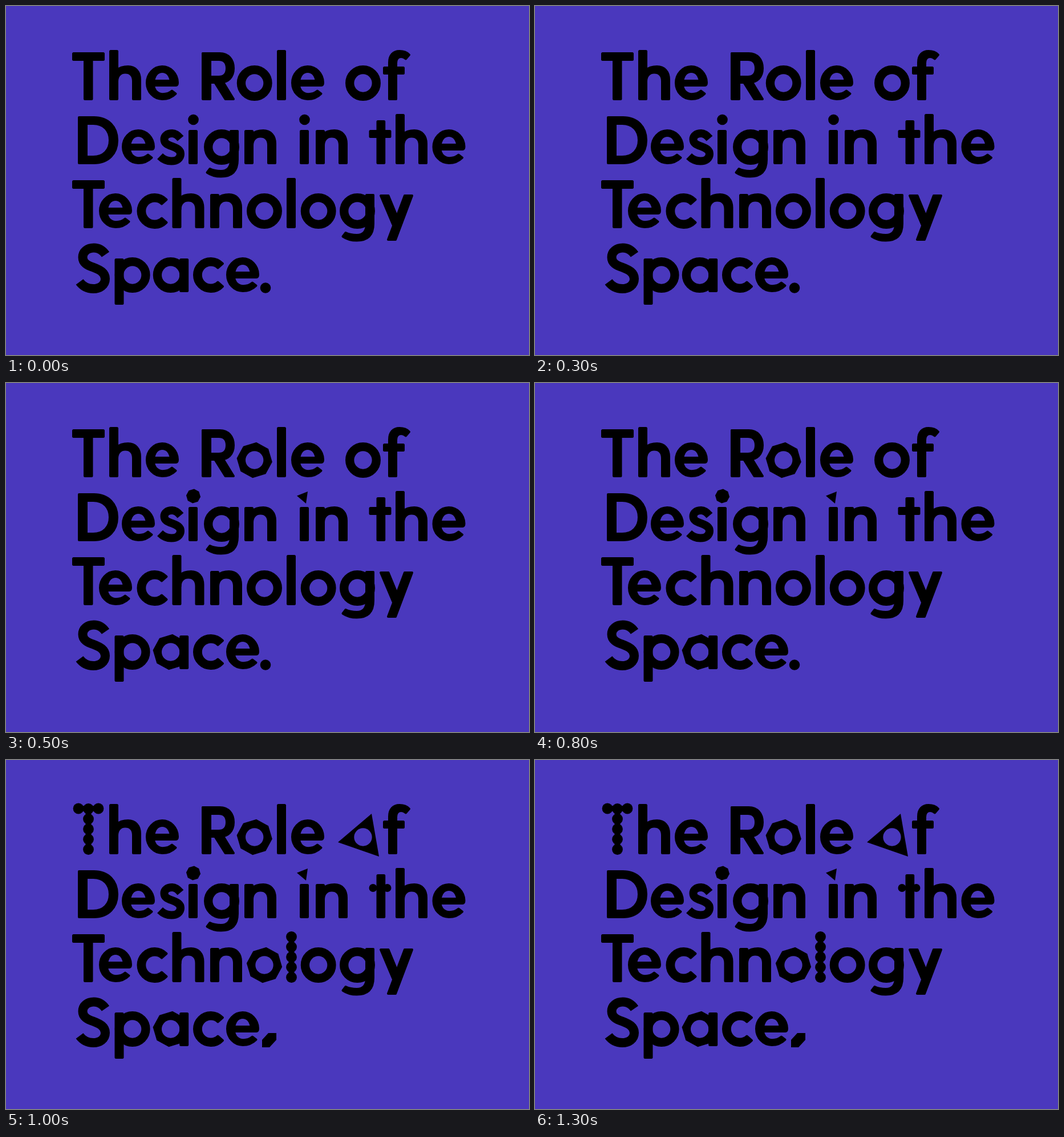
An HTML page with a canvas that plays this animation: 917 px wide and 611 px high, repeating every 1500 ms.

```html
<!DOCTYPE html>
<html lang="en">
<head>
<meta charset="utf-8">
<title>The Role of Design in the Technology Space.</title>
<style>
  html, body { margin: 0; width: 100%; height: 100%; overflow: hidden; background: #4a38bd; }
  canvas { display: block; width: 917px; height: 611px; }
</style>
</head>
<body>
<canvas id="stage" width="917" height="611" role="img"
  aria-label="The Role of Design in the Technology Space."></canvas>
<script>
const ctx = document.getElementById("stage").getContext("2d");
const STEP_MS = 500, STEPS = 3;
const SOFT = 2; // corner rounding

// Outlines are drawn inset by SOFT; the round-joined stroke restores the size.
function soft(d) {
  const path = new Path2D(d);
  ctx.lineWidth = SOFT * 2;
  ctx.fill(path, "evenodd");
  ctx.stroke(path);
}

function bar(x, top, right, bottom) {
  ctx.beginPath();
  ctx.roundRect(x, top, right - x, bottom - top, 2.5);
  ctx.fill();
}

function curve(d, width) {
  ctx.lineWidth = width;
  ctx.stroke(new Path2D(d));
}

function dot(x, y, r) {
  ctx.beginPath();
  ctx.arc(x, y, r, 0, Math.PI * 2);
  ctx.fill();
}

function ring(x) {
  ctx.lineWidth = 15.3;
  ctx.beginPath();
  ctx.arc(x, -30, 23.3, 0, Math.PI * 2);
  ctx.stroke();
}

function polygon(points, hole) {
  const path = new Path2D("M" + points.join("L") + "Z");
  if (hole) {
    path.moveTo(15.7, -30);
    path.arc(0, -30, 15.7, 0, Math.PI * 2);
  }
  ctx.fill(path, "evenodd");
}

function octagon(x, y, r, hole) {
  const points = Array.from({ length: 8 }, (_, i) => {
    const a = (i * 45 + 6) * Math.PI / 180;
    return [x + r * Math.cos(a), y + r * Math.sin(a)];
  });
  polygon(points, hole);
}

function beadColumn(x) {
  for (let i = 0; i < 5; i++) dot(x, -79.5 + i * 17.75, 9.4);
  bar(x - 5, -80, x + 5, -8);
}

const arch = () => soft("M12 -52C18 -57 24 -59 33 -59C46 -59 54 -50 54 -36V-2H42V-33C42 -43 37 -48.5 28 -48.5C20 -48.5 14 -43 14 -33Z");
const iStem = () => bar(0, -60, 16, 0);
const aStem = () => bar(15.5, -59, 31.5, 0);
const tStem = () => bar(0, -77, 15.7, 0);

const glyphs = {
  T() { bar(0, -84, 57, -69); bar(20, -84, 36.5, 0); },
  h() { bar(0, -88, 16, 0); arch(); },
  n() { bar(0, -60, 16, 0); arch(); },
  l() { bar(0, -88, 16, 0); },
  e() {
    soft("M27 -31A27 28.5 0 1 0 0 -2C9 -2 17 -5 23.5 -11.5L17 -16.5C12 -12 7 -10.8 1 -10.8C-8 -10.8 -14 -17 -15 -26H24Q27 -26 27 -31Z" +
      "M-15 -34C-13 -44 -8 -50 0 -50C8 -50 13 -44 15 -34Z");
  },
  R() {
    soft("M2 -82H32C47 -82 56 -71 56 -56C56 -40 46 -31 32 -31H2Z" +
      "M15 -71V-41H30C38 -41 44 -46 44 -56C44 -66 38 -71 30 -71Z");
    bar(0, -84, 17, 0);
    soft("M22 -33L41.5 -2H56L37 -33Z");
  },
  o() { ring(0); },
  f() {
    soft("M2 -2V-66C2 -79 9 -86 20 -86C27 -86 33 -84 37 -79.5L31 -72.5C28 -75 26 -76 23 -76C17 -76 14 -72 14 -65V-2Z");
    bar(-9, -59, 29, -45);
  },
  D() {
    soft("M2 -82H28C54 -82 69 -65 69 -42C69 -19 54 -2 28 -2H2Z" +
      "M15 -71V-13H27C45 -13 56 -25 56 -42C56 -59 45 -71 27 -71Z");
  },
  s() { curve("M40 -45C35 -51 31 -54 25.5 -54C17 -54 11.5 -50 11.5 -43.5C11.5 -36 18 -34 26 -31C34 -28 40 -25 40 -18C40 -10 33 -5.5 24 -5.5C16 -5.5 9 -9 4 -14", 14); },
  S() { curve("M50.5 -66C45 -74 38 -77.5 30 -77.5C19 -77.5 10.5 -71 10.5 -61C10.5 -51 19 -47 29 -43.5C41 -39 50 -34 50 -23.5C50 -12 40 -6 29 -6C19 -6 11 -10 5 -18", 16); },
  i() { iStem(); dot(8.5, -78, 9.3); },
  g() {
    ring(0);
    soft("M28 -58V-8C28 12 18 21.5 -1 21.5C-12 21.5 -19 19 -25.5 14.5L-20.5 8C-14 11 -8 12 -1 12C10 12 16 6 16 -7V-58Z");
  },
  t() { tStem(); bar(-13, -60, 26, -46); },
  c() { soft("M21.5 -50A29 29 0 1 0 21.5 -10L13 -17.5A17.5 17.5 0 1 1 13 -42.5Z"); },
  y() { soft("M45 -57H58L29 20H16Z"); soft("M3 -57H16.5L33 -17L25 -5Z"); },
  p() { bar(0, -59, 16, 22); ring(31.2); },
  a() { ring(0); aStem(); },
  "."() { dot(0, -7.5, 9.3); },

  octagonO() { octagon(0, -30, 31.3, true); },
  triangleO() { polygon([[-44, -21], [15, -71], [28, 4]], true); },
  octagonI() { iStem(); octagon(8.5, -79, 12.6); },
  triangleI() { iStem(); polygon([[-5, -79.5], [14, -87], [11, -66]]); },
  octagonA() { octagon(0, -30, 31.3, true); aStem(); },
  beadT() {
    beadColumn(28.5);
    dot(11, -80, 9.4);
    dot(46, -80, 9.4);
    bar(11, -85, 46, -75);
  },
  beadL() { beadColumn(8.5); },
  beadCross() { tStem(); dot(-6, -53, 7); dot(19, -53, 7); },
  hexagonStop() { polygon([[-6, 2], [-6, -11], [5, -23], [19, -23], [19, -11], [7, 2]]); }
};

// Each letter: glyph, x, and optionally the step at which it becomes another glyph.
const lines = [
  [165, [["T", 116, 2, "beadT"], ["h", 181], ["e", 274], ["R", 343], ["o", 435.7, 1, "octagonO"],
    ["l", 475], ["e", 529], ["o", 626, 2, "triangleO"], ["f", 670]]],
  [277, [["D", 126], ["e", 232], ["s", 266], ["i", 320, 1, "octagonI"], ["g", 378], ["n", 418],
    ["i", 515, 1, "triangleI"], ["n", 543], ["t", 649.5, 2, "beadCross"], ["h", 683], ["e", 776.5]]],
  [389, [["T", 116], ["e", 192], ["c", 260], ["h", 291.5], ["n", 358], ["o", 453, 2, "octagonO"],
    ["l", 492, 2, "beadL"], ["o", 547.7], ["g", 616], ["y", 654]]],
  [501, [["S", 124], ["p", 190.5], ["a", 288.7, 1, "octagonA"], ["c", 358.5], ["e", 415],
    [".", 455, 2, "hexagonStop"]]]
];

function draw(step) {
  ctx.fillStyle = "#4a38bd";
  ctx.fillRect(0, 0, 917, 611);
  ctx.fillStyle = ctx.strokeStyle = "#000";
  ctx.lineJoin = "round";
  for (const [baseline, letters] of lines) {
    for (const [name, x, changeAt, changed] of letters) {
      ctx.save();
      ctx.translate(x, baseline);
      glyphs[step >= changeAt ? changed : name]();
      ctx.restore();
    }
  }
}

const start = performance.now();
function tick(now) {
  draw(Math.floor(Math.max(0, now - start) / STEP_MS) % STEPS);
  requestAnimationFrame(tick);
}
draw(0);
requestAnimationFrame(tick);
</script>
</body>
</html>
```
